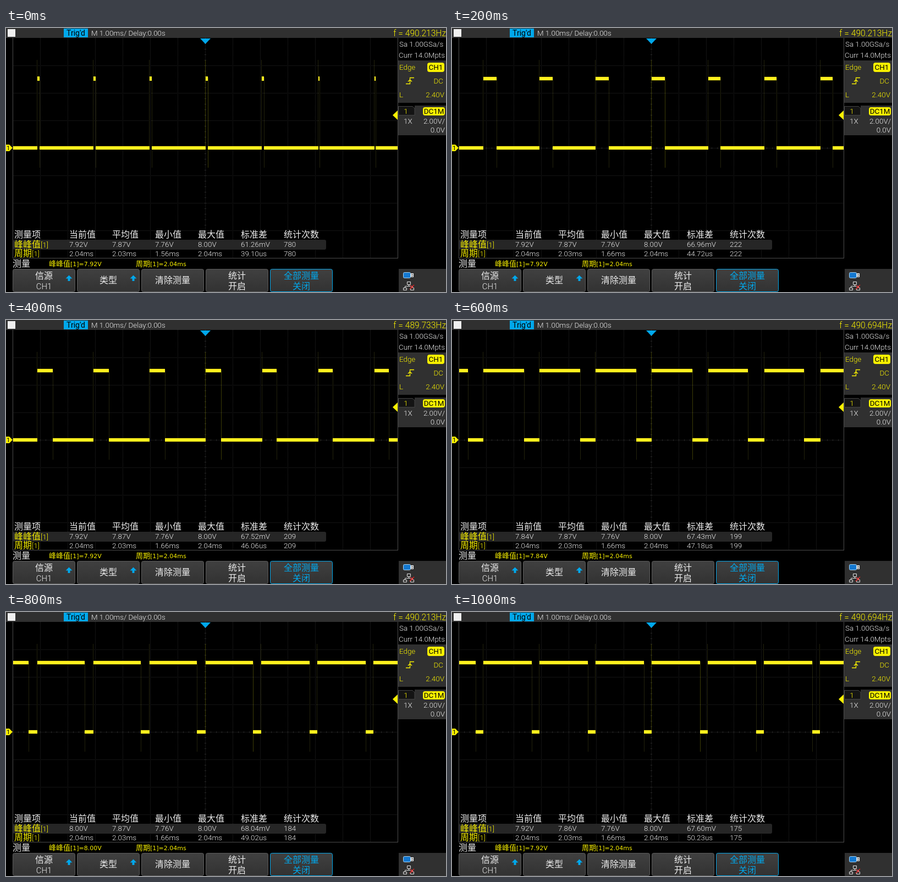
An HTML page for the animation above (1.2 s loop, 800x480 px).

```html
<!DOCTYPE html>
<html lang="zh">
<head>
<meta charset="utf-8">
<title>PWM</title>
<style>
  html, body { margin: 0; width: 100%; height: 100%; overflow: hidden; background: #000; }
  svg { display: block; width: 800px; height: 480px; }
  text { font: 300 13.4px Roboto, "Noto Sans CJK SC Light", "Noto Sans CJK SC", "Noto Sans CJK", sans-serif; fill: #ececec; white-space: pre; }
  .cjk { font-size: 16px; }
  .cjk tspan { font-size: 13.4px; }
  .small { font: 13px "Noto Sans CJK SC", "Noto Sans CJK", sans-serif; }
  .small tspan { font: 11px "DejaVu Sans", sans-serif; }
  .big { font-size: 15.6px; }
  .mid { text-anchor: middle; }
  .end { text-anchor: end; }
  .y { fill: #f8f000; }
  .k { fill: #000; font-weight: 400; }
  .b { fill: #00a8ec; }
  .panel { fill: #303030; }
  .tag { fill: #f8f000; }
  .btn { fill: url(#shade); stroke: #5a5a5a; }
  .crisp { shape-rendering: crispEdges; fill: none; }
</style>
</head>
<body>
<svg viewBox="0 0 800 480">
  <defs>
    <linearGradient id="shade" x2="0" y2="1">
      <stop offset="0" stop-color="#404040"/><stop offset="1" stop-color="#323232"/>
    </linearGradient>
    <clipPath id="plot"><rect x="13" y="19" width="699" height="399"/></clipPath>
    <path id="up" d="M0-5.5 6 .5H2V5H-2V.5H-6Z" fill="#00a8ec"/>
  </defs>

  <rect class="panel" width="800" height="18"/>
  <rect x="3" y="2" width="14" height="14" fill="#f0f0f0"/>
  <rect class="b" x="105" y="1" width="44" height="16"/>
  <text class="k mid" x="127" y="14" style="font-size:14px">Trig'd</text>
  <text x="155" y="14">M 1.00ms/ Delay:0.00s</text>
  <text class="y big end" id="freq" x="800" y="15"></text>

  <g class="crisp">
    <path id="grid" stroke="#262626" stroke-dasharray="1 1"/>
    <path id="ticks" stroke="#303030"/>
    <path d="M12.5 18V418.5H713M712.5 18V418" stroke="#4c4c4c"/>
  </g>

  <g class="crisp" clip-path="url(#plot)">
    <path id="edges" stroke="#22220c"/>
    <path id="mainEdges" stroke="#3c3c06"/>
    <path id="fuzz" stroke="#5a5600" stroke-width="8" stroke-opacity=".5"/>
    <path id="high" stroke="#fff01e"/>
    <path id="low" stroke="#fff01e" stroke-width="6"/>
  </g>

  <path class="b" d="M353 19H372L362.5 29Z"/>
  <path class="tag" d="M703 158.5 712 150V167Z"/>
  <path class="tag" d="M0 212H6L12 218 6 224H0Z"/>
  <text class="k mid" x="4" y="222" style="font-size:11px">1</text>

  <rect x="13" y="385" width="569" height="18" rx="3" fill="#262626"/>
  <g id="table">
    <text class="cjk" x="15" y="381">测量项</text>
    <text class="cjk y" x="15" y="398.500">峰峰值<tspan>[1]</tspan></text>
    <text class="cjk y" x="15" y="415">周期<tspan>[1]</tspan></text>
  </g>
  <text class="cjk" x="12" y="434">测量</text>
  <text class="small y" x="78" y="433">峰峰值<tspan id="vpp"></tspan></text>
  <text class="small y" x="236" y="433">周期<tspan>[1]=2.04ms</tspan></text>

  <g id="menu"></g>

  <text x="715" y="34">Sa 1.00GSa/s</text>
  <text x="714" y="54">Curr 14.0Mpts</text>

  <rect class="panel" x="713" y="59" width="87" height="77"/>
  <text class="y" x="715" y="76">Edge</text>
  <rect class="tag" x="766" y="63" width="31" height="17" rx="4"/>
  <text class="k mid" x="781.500" y="76">CH1</text>
  <path d="M727 101.500H734.500V90.500H742M731 97.500 734.500 94 738 97.500" fill="none" stroke="#f8f000" stroke-width="1.300"/>
  <text class="y end" x="795" y="101">DC</text>
  <text class="y" x="715" y="126">L</text>
  <text class="y end" x="797" y="126">2.40V</text>

  <path class="panel" d="M743 141H800V195H713V159H743Z"/>
  <path d="M713.500 158.500V142.500H739L743 146V158.500Z" fill="#141414" stroke="#444"/>
  <text class="y mid" x="727" y="156">1</text>
  <rect class="tag" x="758" y="144" width="40" height="15" rx="4"/>
  <text class="k mid" x="778" y="156">DC1M</text>
  <text x="723" y="174">1X</text>
  <text class="end" x="798" y="174">2.00V/</text>
  <text class="end" x="798" y="190">0.0V</text>

  <rect class="panel" x="714" y="438" width="86" height="42"/>
  <rect x="722.500" y="444.500" width="13" height="10" rx="2" fill="#1478d0" stroke="#a8d4f4"/>
  <path d="M736 446H741V453H736Z" fill="#ececec"/>
  <path d="M737.500 447.500H739.500V449H737.500ZM737.500 450.500H739.500V452H737.500Z" fill="#222"/>
  <path d="M729.500 461.500H735.500V466.500H729.500ZM732.500 466.500V469.500M725.500 472V469.500H739.500V472M722.500 472.500H728.500V476.500H722.500ZM735.500 472.500H741.500V476.500H735.500Z" fill="none" stroke="#e4e4e4"/>
  <path d="M734 475 742 467M735 468 740 473" stroke="#e02020" stroke-width="1.300"/>
</svg>
<script>
const $ = id => document.getElementById(id);
const STEP = 200, TRIGGER = 363, PERIOD = 102, HIGH = 92, LOW = 218;

// width: pulse width; rise, fall: edge jitter applied from cycle `from` on
const states = [
  { width: 4,  rise: 1,  fall: -1, from: 2, freq: '490.213', vpp: '7.92', avg: '7.87', min: '1.56', dev: ['61.26', '39.10'], count: 780 },
  { width: 24, rise: 1,  fall: -1, from: 1, freq: '490.213', vpp: '7.92', avg: '7.87', min: '1.66', dev: ['66.96', '44.72'], count: 222 },
  { width: 28, rise: 1,  fall: -1, from: 1, freq: '489.733', vpp: '7.92', avg: '7.87', min: '1.66', dev: ['67.52', '46.06'], count: 209 },
  { width: 74, rise: 1,  fall: -1, from: 1, freq: '490.694', vpp: '7.84', avg: '7.87', min: '1.66', dev: ['67.43', '47.18'], count: 199 },
  { width: 86, rise: -1, fall: 1,  from: 1, freq: '490.213', vpp: '8.00', avg: '7.87', min: '1.66', dev: ['68.04', '49.02'], count: 184 },
  { width: 88, rise: 0,  fall: 0,  from: 1, freq: '490.694', vpp: '7.92', avg: '7.86', min: '1.66', dev: ['67.60', '50.23'], count: 175 }
];

function addText(parent, x, y, cls, str) {
  const el = document.createElementNS('http://www.w3.org/2000/svg', 'text');
  el.setAttribute('x', x);
  el.setAttribute('y', y);
  el.setAttribute('class', cls);
  el.textContent = str;
  parent.append(el);
  return el;
}

function drawGrid() {
  let grid = '', ticks = '';
  for (let x = 62; x < 712; x += 50) grid += `M${x + .5} 18V418`;
  for (let y = 68; y < 418; y += 50) grid += `M12 ${y + .5}H712`;
  for (let x = 22; x < 712; x += 10) ticks += `M${x + .5} 217V220`;
  for (let y = 28; y < 418; y += 10) ticks += `M361 ${y + .5}H364`;
  $('grid').setAttribute('d', grid);
  $('ticks').setAttribute('d', ticks);
}

function drawMenu() {
  const items = [['信源', 'CH1'], ['类型'], ['清除测量'], ['统计', '开启'], ['全部测量', '关闭']];
  const menu = $('menu');
  items.forEach((lines, i) => {
    const x = 12 + i * 117, active = i === 4;
    menu.insertAdjacentHTML('beforeend',
      `<rect class="btn" x="${x + .5}" y="438.5" width="113" height="41" rx="3"${active ? ' style="stroke:#00a8ec"' : ''}/>` +
      (i < 2 ? `<use href="#up" x="${x + 102.5}" y="455"/>` : ''));
    lines.forEach((line, j) => {
      const y = lines.length === 1 ? 464 : 456 + j * 19;
      const el = addText(menu, x + 57, y, 'cjk mid' + (active ? ' b' : ''), line);
      if (line === 'CH1') el.style.fontSize = '15px';
    });
  });
}

function makeTable() {
  const heads = ['当前值', '平均值', '最小值', '最大值', '标准差', '统计次数'];
  heads.forEach((h, i) => addText($('table'), 115 + i * 78, 381, 'cjk', h));
  return [398, 415].map(y => heads.map((h, i) => addText($('table'), 115 + i * 78, y, '', '')));
}

function drawWave(s) {
  const rise = k => TRIGGER + k * PERIOD + (k >= s.from ? s.rise : 0);
  const fall = k => TRIGGER + k * PERIOD + s.width + (k >= s.from ? s.fall : 0);
  let high = '', low = '', edges = '', main = '';
  for (let k = -4; k < 4; k++) {
    high += `M${rise(k)} ${HIGH}H${fall(k)}`;
    low += `M${fall(k)} ${LOW}H${rise(k + 1)}`;
    const pair = `M${rise(k) - .5} 58V218M${fall(k) + .5} 90V254`;
    if (k) edges += pair; else main += pair;
  }
  $('high').setAttribute('d', high);
  $('low').setAttribute('d', low);
  $('fuzz').setAttribute('d', high + low);
  $('edges').setAttribute('d', edges);
  $('mainEdges').setAttribute('d', main);
  $('high').setAttribute('stroke-width', s.width < 10 ? 8 : 6);
}

function show(s) {
  drawWave(s);
  $('freq').textContent = `f = ${s.freq}Hz`;
  $('vpp').textContent = `[1]=${s.vpp}V`;
  const rows = [
    [s.vpp + 'V', s.avg + 'V', '7.76V', '8.00V', s.dev[0] + 'mV', s.count],
    ['2.04ms', '2.03ms', s.min + 'ms', '2.04ms', s.dev[1] + 'us', s.count]
  ];
  rows.forEach((row, r) => row.forEach((v, c) => { cells[r][c].textContent = v; }));
}

drawGrid();
drawMenu();
const cells = makeTable();
let current = -1;
function tick() {
  const i = Math.floor(performance.now() / STEP) % states.length;
  if (i !== current) show(states[current = i]);
  requestAnimationFrame(tick);
}
tick();
</script>
</body>
</html>
```
